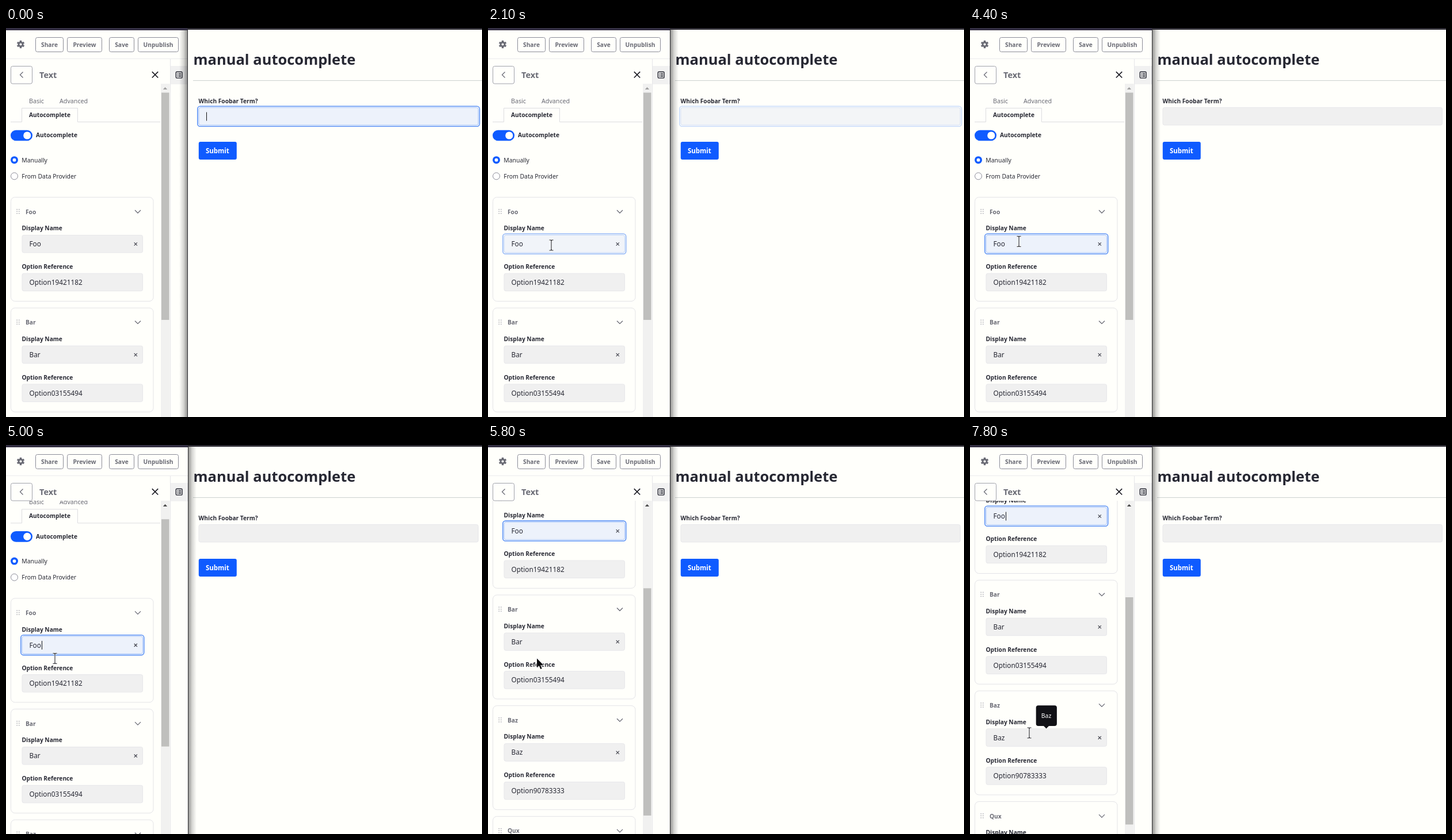
Animation of 827x677 px, one loop 8 s. Source, as an HTML page with a canvas:

```html
<!DOCTYPE html>
<html lang="en">
<head>
<meta charset="utf-8">
<title>manual autocomplete</title>
<style>
  html, body { margin: 0; width: 100%; height: 100%; overflow: hidden; background: #fffffb; }
  canvas { display: block; width: 827px; height: 677px; }
</style>
</head>
<body>
<canvas id="stage" width="827" height="677"></canvas>
<script>
const ctx = document.getElementById('stage').getContext('2d');
const W = 827, H = 677, LOOP = 8000, STEP = 100;
const PAPER = '#fffffb', INK = '#272833', MUTED = '#696a74', BLUE = '#0f5bff';
const FIELD = '#f0f0f0', EDGE = '#e7e7ea', RING = '#5c92f6';

const CARD_TOP = 294.5, CARD_PITCH = 192.7, FIELD_H = 31.5;
const NAME_Y = 65.5, REF_Y = 132.2;
const cards = [
  ['Foo', 'Option19421182'],
  ['Bar', 'Option03155494'],
  ['Baz', 'Option90783333'],
  ['Qux', 'Option58210467']
];

// Pointer glides: start, duration, destination
const glides = [
  [300, 500, 40, 594],
  [800, 500, 111, 386],
  [1500, 300, 110, 378],
  [3900, 200, 85, 371.5],
  [6700, 400, 178, 504],
  [7200, 300, 103, 501]
];

const clamp = v => Math.max(0, Math.min(1, v));
const ease = (t, start, span) => {
  const k = clamp((t - start) / span);
  return k * k * (3 - 2 * k);
};
const blink = (t, half) => Math.floor(t / half) % 2 === 0;
const scrollAt = t => 106.5 * ease(t, 4900, 300) + 145.5 * ease(t, 5500, 410);

function pointerAt(t) {
  let x = 31, y = 173;
  for (const [start, span, toX, toY] of glides) {
    const k = ease(t, start, span);
    x += (toX - x) * k;
    y += (toY - y) * k;
  }
  return [x, y];
}

// y is measured in the scrolled content
function overField(x, y) {
  const local = (y - CARD_TOP) % CARD_PITCH;
  return x > 27 && x < 238 && [NAME_Y, REF_Y].some(top => local >= top && local <= top + FIELD_H);
}

function rect(x, y, w, h, color) {
  ctx.fillStyle = color;
  ctx.fillRect(x, y, w, h);
}

function box(x, y, w, h, r, fill, stroke, width = 1) {
  ctx.beginPath();
  ctx.roundRect(x, y, w, h, r);
  if (fill) { ctx.fillStyle = fill; ctx.fill(); }
  if (stroke) { ctx.strokeStyle = stroke; ctx.lineWidth = width; ctx.stroke(); }
}

function disc(x, y, r, fill, stroke) {
  box(x - r, y - r, 2 * r, 2 * r, r, fill, stroke);
}

function path(points, color, width = 1) {
  ctx.beginPath();
  points.forEach(([x, y]) => ctx.lineTo(x, y));
  ctx.strokeStyle = color;
  ctx.lineWidth = width;
  ctx.stroke();
}

function shape(points, fill) {
  ctx.beginPath();
  points.forEach(([x, y]) => ctx.lineTo(x, y));
  ctx.fillStyle = fill;
  ctx.fill();
}

function text(str, x, y, size = 10.4, color = INK, weight = 400) {
  ctx.font = `${weight} ${size}px "Noto Sans", "Open Sans", sans-serif`;
  ctx.fillStyle = color;
  ctx.fillText(str, x, y);
}

const bold = (str, x, y, size = 10.2, color = INK) => text(str, x, y, size, color, 700);

function cross(x, y, r, color, width) {
  for (const s of [-r, r]) path([[x - s, y - r], [x + s, y + r]], color, width);
}

function field(x, y, w, focus = 0) {
  box(x + .5, y + .5, w - 1, FIELD_H - 1, 3, FIELD, EDGE);
  if (!focus) return;
  ctx.globalAlpha = focus;
  box(x - 1.7, y - 1.7, w + 3.4, FIELD_H + 3.4, 4.5, PAPER, RING, 1.6);
  box(x + .5, y + .5, w - 1, FIELD_H - 1, 3, '#edf2fb', '#a3c2fa');
  ctx.globalAlpha = 1;
}

function gear(x, y) {
  for (let i = 0; i < 6; i++) {
    ctx.save();
    ctx.translate(x, y);
    ctx.rotate(i * Math.PI / 3);
    rect(-1.7, -6.7, 3.4, 4, MUTED);
    ctx.restore();
  }
  disc(x, y, 4.9, MUTED);
  disc(x, y, 2, PAPER);
}

function toolbar() {
  gear(25.5, 28.5);
  ctx.textAlign = 'center';
  for (const [label, x, w] of [['Share', 51, 49], ['Preview', 106, 61], ['Save', 179, 44], ['Unpublish', 229, 71]]) {
    box(x + .5, 16.5, w - 1, 25, 3, null, '#8b8c98');
    bold(label, x + w / 2, 33, 10.2, MUTED);
  }
  ctx.textAlign = 'left';
  rect(0, 53, 316, 1, '#ececee');
}

function panelHeader() {
  rect(0, 54, 285, 43, PAPER);
  box(8.5, 66.5, 37, 30.5, 3, PAPER, '#a0a1ab');
  path([[29.5, 76.5], [24.5, 81.5], [29.5, 86.5]], MUTED, 1.3);
  bold('Text', 58, 86.5, 14.5, MUTED);
  cross(259, 81.3, 5.2, '#1c1c24', 1.7);
}

function sideIcon() {
  rect(285, 54, 1, H, '#e6e6e9');
  rect(286, 66, 30, 32, '#f1f1f1');
  box(295.3, 76.3, 10.8, 10.8, 1.5, null, INK, 1.4);
  for (let y = 78.5; y < 85; y += 2.6) {
    rect(297.4, y, 1.4, 1.4, INK);
    rect(299.8, y, 4.6, 1.4, INK);
  }
}

function card([name, ref], i, focus, selected, caret) {
  ctx.save();
  ctx.translate(0, CARD_TOP + i * CARD_PITCH);
  box(8.5, 0, 247.5, 181, 7, null, '#e3e3e7');
  for (let k = 0; k < 6; k++) rect(18.5 + (k % 2) * 3.5, 20.5 + (k >> 1) * 3.5, 1.4, 1.4, '#9b9ca6');
  bold(name, 34, 29, 10.2, MUTED);
  path([[224, 22.5], [229, 27.5], [234, 22.5]], MUTED, 1.3);
  bold('Display Name', 27.5, 57.8);
  field(27.5, NAME_Y, 210.5, focus);
  if (selected) rect(41, 73.5, 21, 15.5, '#2f559f');
  text(name, 40.5, 85.7, 11.8, selected ? '#fff' : INK);
  if (caret) rect(62, 74, 1, 15, '#111');
  cross(225.3, 81.5, 2.6, '#44454f', 1.2);
  bold('Option Reference', 27.5, 124.8);
  field(27.5, REF_Y, 210.5);
  text(ref, 40.5, 152.5, 11.8);
  ctx.restore();
}

function panel(scroll, focus, selected, caret) {
  ctx.save();
  ctx.beginPath();
  ctx.rect(0, 97, 269, H - 97);
  ctx.clip();
  ctx.translate(0, -scroll);

  text('Basic', 40, 131, 10.7, MUTED);
  text('Advanced', 93, 131, 10.7, MUTED);
  path([[8, 163.5], [27.5, 163.5], [27.5, 139.5], [124.5, 139.5], [124.5, 163.5], [268, 163.5]], '#dcdce0');
  bold('Autocomplete', 40, 155);

  box(8, 177.7, 38, 18.6, 9.3, BLUE);
  disc(36.8, 187, 6.6, '#fff');
  bold('Autocomplete', 52, 190.2);

  disc(14.5, 229.7, 6.5, BLUE);
  disc(14.5, 229.7, 2.9, '#fff');
  disc(14.5, 257.8, 6, '#fff', '#8b8c98');
  text('Manually', 27.3, 234);
  text('From Data Provider', 27.3, 262);

  cards.forEach((c, i) => i ? card(c, i) : card(c, i, focus, selected, caret));
  ctx.restore();

  rect(269, 97, 15.5, H - 97, '#f1f1f0');
  rect(270, 112.5 + scroll * .605, 13.5, 395.5, '#bfbfbd');
  shape([[272.8, 107], [280.2, 107], [276.5, 103]], scroll ? '#4a4a4a' : '#a0a0a0');
}

function form(focus, caret) {
  rect(316, 0, W - 316, H, PAPER);
  bold('manual autocomplete', 325.5, 64, 25.5);
  rect(325, 91, W - 325, 1, '#cdd2d0');
  bold('Which Foobar Term?', 334.5, 131.2);
  field(334.5, 138, 486.5, focus);
  if (caret) rect(348, 146.5, 1, 15, '#111');
  box(334.8, 198, 66, 31, 3, BLUE);
  bold('Submit', 346.9, 218, 11.5, '#fff');
}

// Window edge; the shadow falls on the window behind
function windowEdge(leftActive) {
  const from = leftActive ? 317 : 315, to = leftActive ? 331 : 301;
  const g = ctx.createLinearGradient(from, 0, to, 0);
  g.addColorStop(0, 'rgba(0,0,0,.42)');
  g.addColorStop(.45, 'rgba(0,0,0,.16)');
  g.addColorStop(1, 'rgba(0,0,0,0)');
  rect(Math.min(from, to), 3, 14, H, g);
  rect(0, 0, 316, 4, '#322e42');
  rect(316, 0, W - 316, 3, '#2d2b33');
  rect(leftActive ? 316 : 315, 0, 1, H, '#2b2b30');
}

function tooltip() {
  box(114.7, 453.3, 36.2, 35.7, 4, '#111116');
  shape([[127.5, 488.5], [137.5, 488.5], [132.5, 493.5]], '#111116');
  text('Baz', 123.8, 475, 10.4, '#fff');
}

function beam(x, y) {
  for (const [color, width] of [['rgba(255,255,255,.8)', 2.6], ['#26262b', 1.1]]) {
    path([[x, y - 8], [x, y + 8]], color, width);
    for (const s of [-1, 1]) {
      path([[x - 3.5, y + 9 * s], [x - 1, y + 9 * s], [x, y + 8 * s], [x + 1, y + 9 * s], [x + 3.5, y + 9 * s]], color, width);
    }
  }
}

function arrow(x, y) {
  const pts = [[0, 0], [0, 16], [3.7, 12.6], [6.3, 18.5], [8.7, 17.4], [6.2, 11.7], [11.3, 11.4], [0, 0]]
    .map(([a, b]) => [x + a, y + b]);
  path(pts, '#fff', 1.6);
  shape(pts, '#0b0b0e');
}

function pointer(t) {
  const [x, y] = pointerAt(t);
  // The shape catches up with scrolling half a second late
  const draw = overField(x, y + scrollAt(t - 500)) ? beam : arrow;
  draw(x, y);
}

function draw(time) {
  const t = Math.floor(time / STEP) * STEP;
  const leftActive = t >= 2000;
  const swap = clamp((t - 1900) / 300);
  const selected = t >= 2200 && t < 3800;
  const leftCaret = leftActive && !selected && blink(t - 3800, 600);
  const rightCaret = !leftActive && blink(t + 450, 650);

  rect(0, 0, W, H, PAPER);
  toolbar();
  panel(scrollAt(t), swap, selected, leftCaret);
  panelHeader();
  sideIcon();
  form(1 - swap, rightCaret);
  windowEdge(leftActive);
  if (t >= 7800) tooltip();
  if (t >= 200) pointer(t);
}

function tick() {
  draw(performance.now() % LOOP);
  requestAnimationFrame(tick);
}
tick();
</script>
</body>
</html>
```
